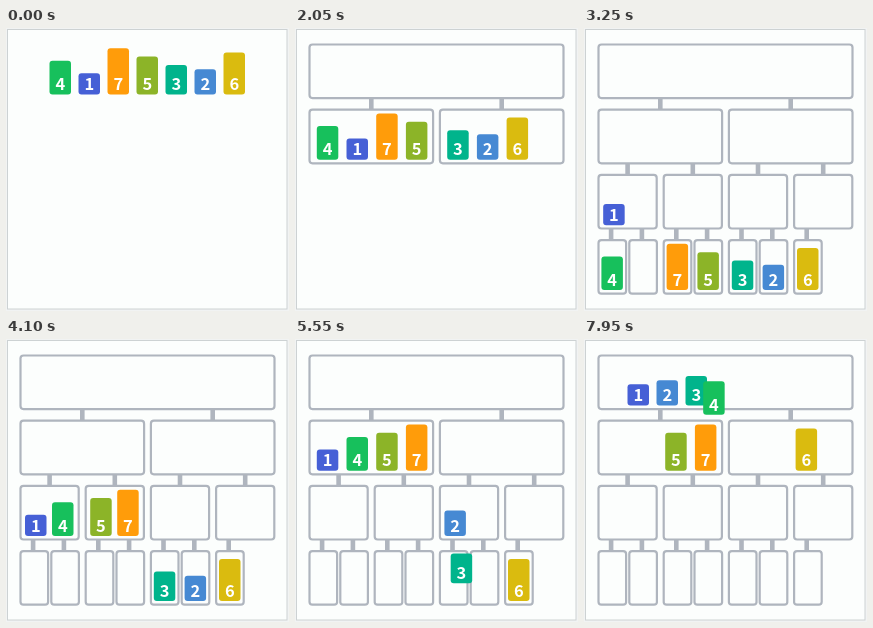
These frames come from a looping animation (283x283 px, 8000 ms). An HTML page:

```html
<!DOCTYPE html>
<html lang="en">
<head>
<meta charset="utf-8">
<title>Merge sort</title>
<style>
  html, body { margin: 0; width: 100%; height: 100%; overflow: hidden; background: #f1f3f3; }
  svg { display: block; width: 100vw; height: 100vh; }
  text { font: 700 16.5px "Noto Sans CJK JP", "Noto Sans CJK", "Noto Sans", sans-serif; fill: #fff; text-anchor: middle; }
</style>
</head>
<body>
<svg viewBox="0 0 283 283">
  <rect x="1.5" y="1.5" width="279.5" height="279.5" fill="#fcfefd" stroke="#cdd2d3"/>
  <g id="tree"></g>
  <g id="bars"></g>
</svg>
<script>
const LOOP = 8000, MOVE = 230, ROW = 65.2, LEFT = 14.5, TOP = 16.5;
const BAR_WIDTH = 21.5, GREY = '#afb5be';
const input = [4, 1, 7, 5, 3, 2, 6];
const colors = ['#4660d6', '#4689d3', '#00b48c', '#17c05c', '#8cb428', '#dabb0f', '#ff9c0a'];

// Box columns per level: how many, their widths and when they fade in.
const levels = [
  { count: 1, width: 254, show: 1430, fade: 250 },
  { count: 2, width: 123.6, show: 1710, fade: 140, drop: 1820 },
  { count: 4, width: 58.2, show: 2090, fade: 140, drop: 2200 },
  { count: 7, width: 27.6, show: 2560, fade: 140, drop: 2690 }
];

// Each merge lifts its values one after another into consecutive slots.
const merges = [
  { start: 3045, level: 2, slot: 0, order: [1, 4] },
  { start: 3635, level: 2, slot: 2, order: [5, 7] },
  { start: 4245, level: 1, slot: 0, order: [1, 4, 5, 7] },
  { start: 5277, level: 2, slot: 4, order: [2, 3] },
  { start: 5890, level: 2, slot: 6, order: [6] },
  { start: 6297, level: 1, slot: 4, order: [2, 3, 6] },
  { start: 7132, level: 0, slot: 0, order: [1, 2, 3, 4, 5, 6, 7] }
];

function add(parent, tag, attrs) {
  const node = document.createElementNS('http://www.w3.org/2000/svg', tag);
  for (const key in attrs) node.setAttribute(key, attrs[key]);
  return parent.appendChild(node);
}

const clamp = v => Math.min(1, Math.max(0, v));

// cubic-bezier(.25, .1, .25, 1)
function ease(x) {
  if (x <= 0 || x >= 1) return clamp(x);
  let lo = 0, hi = 1;
  for (let i = 0; i < 22; i++) {
    const s = (lo + hi) / 2;
    const bx = .75 * s * (1 - s) + s ** 3;
    if (bx < x) lo = s; else hi = s;
  }
  const s = lo, r = 1 - s;
  return .3 * s * r * r + 3 * s * s * r + s ** 3;
}

function boxLeft(level, i) {
  if (level === 3) return LEFT + ROW * (i >> 1) + 30.8 * (i & 1);
  return LEFT + ROW * 4 / 2 ** level * i;
}

function slotPoint(level, i) {
  const x = [
    () => 43.5 + 29 * i,
    () => boxLeft(1, i >> 2) + 7.3 + 29.7 * (i & 3),
    () => boxLeft(2, i >> 1) + 4.5 + 27 * (i & 1),
    () => boxLeft(3, i) + 2.9
  ][level]();
  return { x, y: 66.5 + ROW * level };
}

const tree = document.getElementById('tree');
levels.forEach((level, depth) => {
  level.group = add(tree, 'g', {});
  const y = TOP + ROW * depth;
  for (let i = 0; i < level.count; i++) {
    const x = boxLeft(depth, i);
    if (depth) {
      const middle = x + level.width / 2 - (depth === 3 ? 1.2 : 0);
      add(level.group, 'rect', { x: middle - 2.3, y: y - 11.4, width: 4.6, height: 11.2, fill: GREY });
    }
    add(level.group, 'rect', {
      x, y, width: level.width, height: 53.6, rx: 3,
      fill: 'none', stroke: GREY, 'stroke-width': 2.2
    });
  }
});

const bars = colors.map((fill, i) => {
  const value = i + 1, height = 17 + 4.18 * value, slot = input.indexOf(value);
  const group = add(document.getElementById('bars'), 'g', {});
  add(group, 'rect', { y: -height, width: BAR_WIDTH, height, rx: 3, fill });
  add(group, 'text', { x: BAR_WIDTH / 2, y: -4.3 }).textContent = value;
  const stops = levels.map((l, depth) => ({ at: l.drop || 0, ...slotPoint(depth, slot) }));
  for (const m of merges) {
    const k = m.order.indexOf(value);
    if (k >= 0) stops.push({ at: m.start + k * MOVE, ...slotPoint(m.level, m.slot + k) });
  }
  return { group, stops };
});

function draw(t) {
  for (const l of levels) l.group.setAttribute('opacity', clamp((t - l.show) / l.fade));
  for (const { group, stops } of bars) {
    let { x, y } = stops[0];
    for (const stop of stops.slice(1)) {
      const p = ease((t - stop.at) / MOVE);
      x += (stop.x - x) * p;
      y += (stop.y - y) * p;
    }
    group.setAttribute('transform', `translate(${x.toFixed(2)} ${y.toFixed(2)})`);
  }
}

const began = performance.now();
function frame() {
  draw((performance.now() - began) % LOOP);
  requestAnimationFrame(frame);
}
frame();
</script>
</body>
</html>
```
